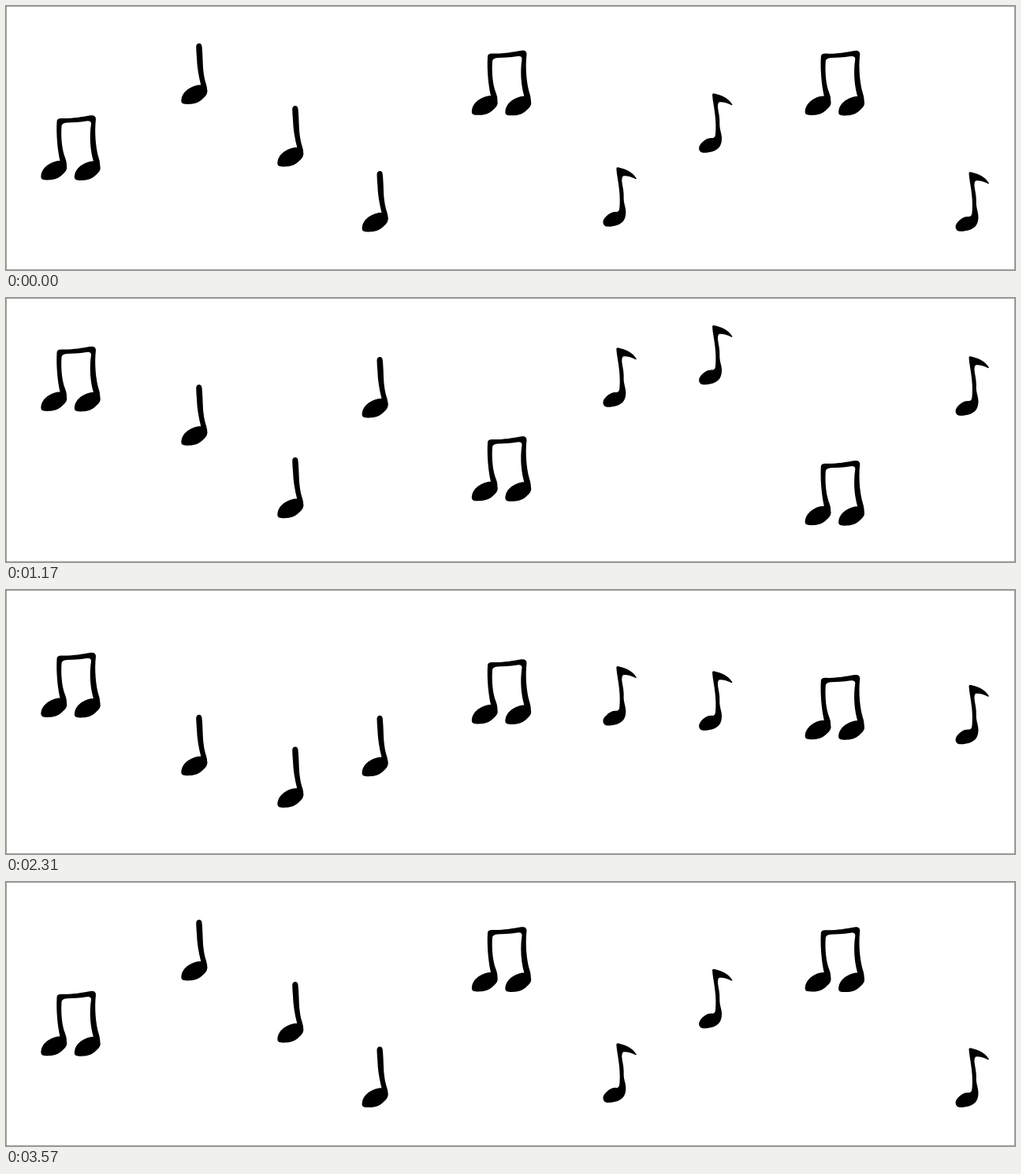
Write an HTML page that moves like this. It is 1280 px wide and 336 px high and loops after 3600 ms.

```html
<!DOCTYPE html>
<html lang="en">
<head>
<meta charset="utf-8">
<title>Dancing notes</title>
<style>
  html, body { margin: 0; width: 100%; height: 100%; overflow: hidden; background: #fff; }
  svg { display: block; width: 1280px; height: 336px; }
</style>
</head>
<body>
<svg id="stage" viewBox="0 0 1280 336">
  <defs>
    <path id="head" d="M26 53C17 52 3 59 .7 70Q-.5 75 2 76.5C8 78.5 20 77.5 26 72C29 69 33 66.5 33.2 62Q33.5 58 31 53Z"/>
    <g id="quarter">
      <use href="#head"/>
      <path d="M19.2 4Q19.7 0 23 0Q26 0 26.5 4C27.7 15 27.5 27 28.5 36C29.3 43 30.5 48 32 52.500Q33.500 57 33.300 62L22 58Q25.500 56 25 52C22.500 42 20.300 30 20 18Q19.300 10 19.200 4Z"/>
    </g>
    <g id="beamed">
      <use href="#head" y="5"/>
      <use href="#head" x="42.5" y="5.500"/>
      <path d="M24.500 58C21.500 45 19.500 25 20.500 8Q20.500 4 26 4C40 4.500 50 2.500 63 .3Q70 -.7 70 5C68 22 70 42 73.500 54Q75 58 75.300 63L67 59C63 45 61.500 28 64 11Q64 6.500 58 7.500C48 9 40 9 33 9.500Q26.500 10 26.500 14C25.500 28 27 44 31 54Q32.700 58 33 63Z"/>
    </g>
    <path id="eighth" d="M17 2Q17 -.3 20 .5C30 3 37 6 42.500 14.500Q42.500 15.500 41 15C36 12.500 29 10.500 25.500 11.500Q23.700 13 24 18C24.800 25 26.700 31 26.300 38C26 46 28.700 50 29 57C29 66 26 71 18 74C11 76 4 76.500 2 74.500C-.5 72 -.5 68 2 65C6 60 11 56.500 17 57Q20.700 57 21 52C21.700 44 21.500 36 20.500 28C19.500 18 17.500 10 17 2Z"/>
  </defs>
  <rect x=".5" y=".5" width="1279" height="335" fill="none" stroke="#a0a0a0"/>
</svg>
<script>
const LOOP = 3600;
const stage = document.getElementById('stage');

// shape, x, resting y, far y, turning times between the two heights
const notes = [
  ['beamed', 44, 139, 40, [900, 1800, 2700]],
  ['quarter', 222, 47.5, 205, [660, 1560, 2730]],
  ['quarter', 344, 127, 224, [1680]],
  ['quarter', 451.3, 210, 68, [1050, 1950, 2850]],
  ['beamed', 590.5, 56.4, 177.5, [1110, 2010, 2910]],
  ['eighth', 757.3, 205, 43, [1500]],
  ['eighth', 879, 111, 34, [1230, 2130, 3030]],
  ['beamed', 1013.3, 56.6, 217.5, [1390, 2040, 2760]],
  ['eighth', 1204.5, 211, 65, [1380]],
].map(([shape, x, rest, far, turns]) => {
  const el = document.createElementNS('http://www.w3.org/2000/svg', 'use');
  el.setAttribute('href', '#' + shape);
  el.setAttribute('x', x);
  stage.append(el);
  return { el, rest, far, times: [0, ...turns, LOOP] };
});

const smooth = t => t * t * (3 - 2 * t);

function heightAt({ rest, far, times }, t) {
  const next = times.findIndex(time => time > t);
  const start = times[next - 1];
  const p = smooth((t - start) / (times[next] - start));
  return rest + (far - rest) * (next % 2 ? p : 1 - p);
}

function draw() {
  const t = performance.now() % LOOP;
  for (const note of notes) note.el.setAttribute('y', heightAt(note, t));
  requestAnimationFrame(draw);
}
draw();
</script>
</body>
</html>
```
